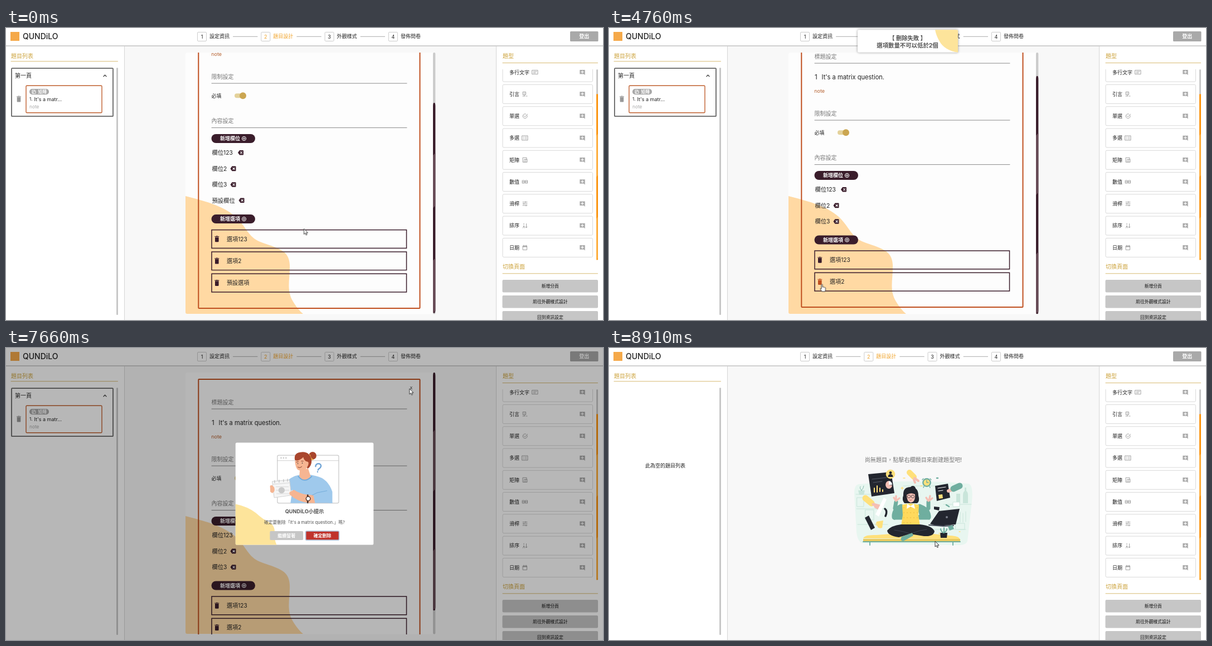
Write an HTML page that moves like this. It is 1071 by 523 pixels and loops after 9.28 s.

```html
<!DOCTYPE html>
<html lang="zh-Hant">
<head>
<meta charset="utf-8">
<title>問卷題目設計</title>
<style>
html, body { margin: 0; width: 100%; height: 100%; overflow: hidden; background: #f8f8f8; }
svg { display: block; width: 1071px; height: 523px; font-family: Inter, "Noto Sans CJK TC", "Noto Sans CJK", sans-serif; }
.mid { text-anchor: middle; }
.b { font-weight: 700; }
.m { font-weight: 500; }
.line { fill: none; stroke-linecap: round; stroke-linejoin: round; }
#scroll, #thumb, #lower, #frame, #field4, #opt3, #hotTag, #hotBin3, #hotBin2, #halo,
#editor, #empty, #toast, #shade, #modal, #cursor, #arrow, #hand {
  animation: 9280ms linear infinite;
}
#scroll { animation-name: scroll; }
#thumb { animation-name: thumb; }
#lower { animation-name: lower; animation-timing-function: step-end; }
#frame { animation-name: frame; animation-timing-function: step-end; }
#field4 { animation-name: field4; animation-timing-function: step-end; }
#opt3 { animation-name: opt3; animation-timing-function: step-end; }
#hotTag { animation-name: hotTag; animation-timing-function: step-end; }
#hotBin3 { animation-name: hotBin3; animation-timing-function: step-end; }
#hotBin2 { animation-name: hotBin2; animation-timing-function: step-end; }
#halo { animation-name: halo; animation-timing-function: step-end; }
#editor { animation-name: editor; animation-timing-function: step-end; }
#empty { animation-name: empty; animation-timing-function: step-end; }
#hand { animation-name: hand; animation-timing-function: step-end; }
#arrow { animation-name: arrow; animation-timing-function: step-end; }
#cursor { animation-name: cursor; animation-timing-function: ease-in-out; }
#shade { animation-name: shade; }
#toast { animation-name: toast; transform-origin: 535.5px 23.5px; filter: drop-shadow(0 0 2px #0006); }
#modal { animation-name: modal; transform-origin: 535.5px 261px; }

@keyframes scroll {
  0% { transform: translateY(-112px); animation-timing-function: step-end; }
  9.7% { transform: translateY(-85.4px); animation-timing-function: step-end; }
  26.72%, 61.31% { transform: translateY(-46px); }
  65.7% { transform: translateY(-17px); }
  67.6%, 100% { transform: none; }
}
@keyframes thumb {
  0% { transform: translate(766px, 134px) scaleY(3.764); animation-timing-function: step-end; }
  9.7% { transform: translate(766px, 116.2px) scaleY(3.957); animation-timing-function: step-end; }
  26.72%, 61.31% { transform: translate(766px, 86px) scaleY(4.26); }
  65.7% { transform: translate(766px, 59.5px) scaleY(4.26); }
  67.6%, 100% { transform: translate(766px, 44px) scaleY(4.26); }
}
@keyframes lower { 0% { transform: translateY(28.6px); } 9.7%, 100% { transform: none; } }
@keyframes frame { 0% { height: 558px; } 9.7% { height: 529.4px; } 26.72%, 100% { height: 490px; } }
@keyframes field4 { 0% { opacity: 1; } 9.7%, 100% { opacity: 0; } }
@keyframes opt3 { 0% { opacity: 1; } 26.72%, 100% { opacity: 0; } }
@keyframes hotTag { 0% { fill: #3a1d2b; } 6.6%, 100% { fill: #bf4f1f; } }
@keyframes hotBin3 { 0% { fill: #3a1d2b; } 24.4%, 100% { fill: #bf4f1f; } }
@keyframes hotBin2 { 0% { fill: #3a1d2b; } 26.72% { fill: #bf4f1f; } 53%, 100% { fill: #3a1d2b; } }
@keyframes halo { 0% { opacity: 0; } 79.6% { opacity: 1; } 81.79%, 100% { opacity: 0; } }
@keyframes editor { 0% { opacity: 1; } 93.9%, 100% { opacity: 0; } }
@keyframes empty { 0% { opacity: 0; } 93.9%, 100% { opacity: 1; } }
@keyframes hand {
  0% { opacity: 0; } 6.6% { opacity: 1; } 10.67% { opacity: 0; } 24.4% { opacity: 1; }
  53% { opacity: 0; } 88.6% { opacity: 1; } 95.6%, 100% { opacity: 0; }
}
@keyframes arrow {
  0% { opacity: 1; } 6.6% { opacity: 0; } 10.67% { opacity: 1; } 24.4% { opacity: 0; }
  53% { opacity: 1; } 88.6% { opacity: 0; } 95.6%, 100% { opacity: 1; }
}
@keyframes cursor {
  0%, .43% { transform: translate(534.5px, 359.5px); }
  6.9%, 10.6% { transform: translate(426px, 309px); }
  10.67%, 15.84% { transform: translate(430px, 311px); }
  23.4% { transform: translate(383px, 464px); }
  25.32%, 51.2% { transform: translate(380px, 460px); }
  51.29%, 51.5% { transform: translate(382.5px, 459.5px); }
  61.1%, 66.3% { transform: translate(617px, 323px); }
  71.23%, 71.44% { transform: translate(680px, 254px); }
  81.25%, 82.4% { transform: translate(724px, 72.5px); }
  89.22%, 100% { transform: translate(585px, 346px); }
}
@keyframes toast {
  0%, 35.44% { opacity: 0; transform: translateY(-5.6px) rotate(2deg); }
  35.45% { opacity: 1; transform: translateY(-5.6px) rotate(2deg); }
  37.23% { transform: rotate(-2deg); }
  39% { transform: translateY(2.8px) rotate(2deg); }
  40.84%, 51.6% { opacity: 1; transform: none; }
  52.7%, 100% { opacity: 0; transform: rotate(1deg); }
}
@keyframes shade { 0%, 81.79% { opacity: 0; } 82.87%, 93.53% { opacity: .4; } 94.9%, 100% { opacity: 0; } }
@keyframes modal {
  0%, 81.78% { opacity: 0; transform: scale(.7); }
  81.79% { opacity: 1; transform: scale(.7); }
  83.24% { transform: scale(1.05); }
  84.37% { transform: scale(.95); }
  85.02%, 93.53% { opacity: 1; transform: none; }
  95.15%, 100% { opacity: 0; transform: scale(.5); }
}
</style>
</head>
<body>
<script>
const DARK = '#3a1d2b', RUST = '#bf4f1f', GOLD = '#cda43f', INK = '#222';
const text = (x, cy, s, size = 9, fill = INK, cls = '') =>
  `<text x="${x}" y="${(cy + size * .37).toFixed(2)}" font-size="${size}" fill="${fill}" class="${cls}">${s}</text>`;
const rect = (x, y, w, h, fill, more = '') => `<rect x="${x}" y="${y}" width="${w}" height="${h}" fill="${fill}" ${more}/>`;
const path = (d, fill, more = '') => `<path d="${d}" fill="${fill}" ${more}/>`;
const line = (d, color, w = 1) => `<path class="line" d="${d}" stroke="${color}" stroke-width="${w}"/>`;
const dot = (x, y, r, fill, more = '') => `<circle cx="${x}" cy="${y}" r="${r}" fill="${fill}" ${more}/>`;
const at = (x, y, body, more = '') => `<g transform="translate(${x} ${y})" ${more}>${body}</g>`;
const group = (id, body) => `<g id="${id}">${body}</g>`;
const each = (list, fn) => list.map(fn).join('');

const bin = (x, y, fill, id = '') => at(x, y, path(
  'M-3.3-3.3h6.6v7.4q0 1.2-1.2 1.2h-4.2q-1.2 0-1.2-1.2zM-4-5h2.3l.7-.7h2l.7.7h2.3v1.1h-8z', fill, id && `id="${id}"`));
const tag = (x, y, id = '') => at(x, y,
  path('M-5 0l3-4.3h6q1 0 1 1v6.6q0 1-1 1h-6z', DARK, id && `id="${id}"`) + line('M-.5-1.6l3.2 3.2m0-3.2l-3.2 3.2', '#fff', 1.1));
const pill = (y, label) => rect(368.5, y - 8, 78.5, 16, DARK, 'rx="8"') + text(384, y, label, 9, '#fff', 'b') +
  dot(427, y, 3.6, 'none', 'stroke="#fff"') + line(`M425 ${y}h4m-2-2v4`, '#fff', .9);
const section = (y, label) => text(368.5, y, label, 10, '#777') + line(`M369 ${y + 12.3}H719`, '#8b8b8b');
const field = (y, label, x, id) => text(369.5, y, label, 10.3) + tag(x, y, id);
const option = (y, label, id) => rect(369, y - 16.4, 349.5, 32.8, 'none', `stroke="${DARK}" stroke-width="1.5"`) +
  bin(378.3, y, DARK, id) + text(396, y, label, 10.1);

function header() {
  const names = ['設定資訊', '題目設計', '外觀樣式', '發佈問卷'];
  return rect(0, 0, 1071, 32, '#fff') + line('M0 32H1071', '#c2c2c2', 1.3) +
    rect(8, 7, 16, 16, '#f5a94a') + text(30, 15, 'QUNDiLO', 14, INK, 'm') +
    each(names, (s, i) => {
      const x = 343 + i * 114.3, on = i === 1 ? '#f0a52e' : INK;
      return rect(x + .5, 7.5, 16, 16, '#fff', 'rx="1.5" stroke="#ccc"') + text(x + 8.5, 15.4, i + 1, 9, on, 'mid') +
        text(x + 22, 15, s, 9, on, 'm') + (i < 3 ? line(`M${x + 64.5} 15.3h43.5`, '#aaa') : '');
    }) + rect(1012, 6, 50.5, 18, '#a9a9a9', 'rx="1.5"') + text(1037.3, 15, '登出', 9, '#fff', 'b mid');
}

const stripes = (x, y, w, h, dark, light) => rect(x, y, w, h, dark, 'rx="1.5"') + each([1, 3], k =>
  path(`M${x} ${y + h * k / 4}l${w} ${-h / 100}v${h / 4}l${-w} ${h / 100}z`, light));

function sidebars() {
  const kinds = ['多行文字', '引言', '單選', '多選', '矩陣', '數值', '滑桿', '排序', '日期'];
  const icons = [
    'M-5-3.5h10v7h-10zM-3-1.2h6M-3 1.2h4', 'M-3.5-4h5v5h-5zM-2-1.5h2M-4 3.5h4M2 3.5h2M-1 1v2',
    'M4-1A4 4 0 1 1 1.5-3.7M-2-.5l2 2 4.5-5', 'M-5-4h10v8h-10zM-3-1.5h1M0-1.5h3M-3 1.5h1M0 1.5h3',
    'M3-1v-3h-7v8h3M-1-1h5v5h-5zM1.5-1v5', 'M-4.5-2.5h3.5v5h-3.5zM1-2.5h3.5v5h-3.5zM-4.5 0h3.5M1 0h3.5',
    'M-4-3h8M-4 0h8M-4 3h8M1-4v2M-2-1v2M2 2v2', 'M-3.5 4l1.5-4 1.5 4M-2-4v2M2.5-3.5v7M.8 2l1.7 1.7L4.2 2',
    'M-3.5-3h7v7h-7zM-3.5-1.5h7M-2-4.5v1.5M2-4.5v1.5M-3.5-2.3h7'];
  const item = (s, i) => {
    const y = 79.2 + i * 39.27;
    return rect(891, y - 17, 161.5, 34, '#fff', 'rx="2" stroke="#d9d9d9"') + text(903, y, s, 9, INK, 'm') +
      at(i ? 931 : 949, y, line(icons[i], '#999', .9)) +
      at(1034, y, path('M-4.7-4.3h9.4v9.4l-2-1.8h-7.4z', '#aaa') + line('M-2.2-.5h4.4M0-2.7v4.4', '#fff', 1.2));
  };
  return rect(0, 32.6, 212, 491, '#fff') + line('M212.5 33V523', '#d5d5d5') +
    text(9, 50, '題目列表', 10, GOLD) + line('M9 59.7H200.5', '#d8bb74') + rect(198, 71, 3, 443, '#c8c8c8', 'rx="1.5"') +
    rect(880, 32.6, 191, 491, '#fff') + line('M879.5 33V523', '#d5d5d5') +
    text(891, 50, '題型', 10, GOLD) + line('M891 62.5H1061.5', '#d8bb74') +
    `<g clip-path="url(#kinds)">${each(kinds, item)}</g>` +
    rect(1059, 74, 3, 341, '#c8c8c8', 'rx="1.5"') + stripes(1059, 118, 3, 297.5, '#fb9410', '#fdac3b') +
    text(891, 427.5, '切換頁面', 10, GOLD) + line('M891 439.8H1061.5', '#d8bb74') +
    each(['新增分頁', '前往外觀樣式設計', '回到資訊設定'], (s, i) =>
      rect(890.5, 451 + i * 28, 171.5, 22.5, '#c6c6c6', 'rx="2"') + text(976.3, 462.5 + i * 28, s, 7.8, '#111', 'mid m'));
}

function pageCard() {
  return rect(10, 72.2, 182, 86, '#fff', 'rx="1" stroke="#666" stroke-width="1.8"') +
    text(16, 85.5, '第一頁', 10) + line('M175 86.8l2.5-2.6 2.5 2.6', INK, 1.2) + bin(23, 127.3, '#999') +
    rect(36, 103.2, 136, 48.5, '#fff', 'rx="1.5" stroke="#c0602f" stroke-width="1.4"') +
    rect(42, 109, 35, 10.3, '#a8a8a8', 'rx="5"') +
    at(50, 114.2, line('M2-1v-2h-5v6h2M-1-1h4v4h-4z', '#fff', .9)) + text(57.5, 114.2, '矩陣', 7.8, '#fff', 'b') +
    text(42, 127.3, '1.', 8) + text(50.5, 127.3, "It's a matr...", 9) + text(42, 140.5, 'note', 8.3, '#aaa');
}

function editor() {
  const body = `<rect id="frame" x="345.3" y="56" width="397.2" height="490" rx="1" fill="none" stroke="${RUST}" stroke-width="2"/>` +
    dot(727, 71, 8.5, '#bdbdbd', 'id="halo"') + text(727, 70.5, 'x', 9, '#444', 'mid') +
    section(96.8, '標題設定') + text(369, 134, '1', 11.5) + text(381.5, 134, "It's a matrix question.", 11.1) +
    text(368.3, 158.3, 'note', 9, '#b5602f') + section(198.8, '限制設定') +
    text(368.5, 233.5, '必填', 9) + rect(410, 229.3, 18, 8, '#e4d29b', 'rx="4"') + dot(425, 233.3, 6, '#cba651') +
    section(278.3, '內容設定') + pill(310, '新增欄位') +
    field(335.3, '欄位123', 421) + field(363.9, '欄位2', 407.5) + field(392.5, '欄位3', 407.5) +
    group('field4', field(420.8, '預設欄位', 422.5, 'hotTag')) +
    group('lower', pill(425.5, '新增選項') + option(461.4, '選項123') + option(500.7, '選項2', 'hotBin2') +
      group('opt3', option(540, '預設選項', 'hotBin3')));
  return pageCard() + rect(322, 44, 448, 468.5, '#fdfdfd', 'rx="4"') +
    path('M322 301C352 309 388 317 412 338 432 357 434 374 456 383 484 394 508 396 509 424 510 450 502 468 515 490 521 500 527 507 533 512H325q-3 0-3-3z', '#ffd9a3') +
    `<g clip-path="url(#panel)">${group('scroll', body)}</g>` +
    rect(766, 44, 4.3, 468.5, '#cbcbcb', 'rx="2"') + group('thumb', stripes(0, 0, 4.3, 100, DARK, '#664a55'));
}

function deskScene() {
  const black = '#23262f', teal = '#6fae9f', mint = '#c9e5da', sun = '#ffe07a', skin = '#f5bfb4';
  return path('M448 244Q545 234 645 243 654 246 651 275L643 346Q640 353 630 353L455 350Q446 347 444 330L440 260Q440 245 448 244z', '#e8f6f0') +
    line('M443 262H500M444 288H500M446 316H500M600 280H650M582 325H640M528 247H600M445 268h12v16h-12zM460 290h15v18h-15zM630 294v18M635 296v16M640 293v18M622 314h16v11h-16z', mint) +
    path('M623 261h7v17h-7zM635 264q0-6 3-8v-6h3v6q3 2 3 8v14h-9zM447 255h12l-2 8h-8z', mint) + line('M453 255q-4-4-2-7M453 255q4-4 4-8', teal, .8) +
    path('M456 341Q458 334 480 335L505 333H582L612 336Q628 337 629 342z', sun) + rect(456, 342, 174, 4, '#e8c95e') +
    line('M456 347H630M468 347v6M617 347v6', teal, 1.8) +
    path('M465 226L506 222 512 260 471 266z', black) + line('M476 258v-7M481 258v-11M486 257v-6M491 257v-3', sun, 2) +
    line('M472 235l26-3M474 241l16-2', '#565b68') + path('M502 238a6 7 0 1 0 6 8l-6-1z', skin) + path('M502 238a6 7 0 0 1 6 7l-6 0z', '#fff') +
    dot(505, 226, 8.3, sun) + dot(505, 223.5, 2.4, black) + path('M500.5 231q0-5 4.5-5t4.5 5z', black) +
    line('M539 223L547 231', sun, 10) + line('M548 233l7 5M547 236l2 5', skin, 4) +
    dot(570, 241, 6.7, sun, `stroke="${teal}" stroke-width="2.4"`) + line('M570 237v4h3M564 234l-2 2M576 234l2 2M565 248l-1 2M575 248l1 2', teal, 1.4) +
    path('M585 247L608 243 612 268 588 274z', black) + line('M590 251l14-2M591 256l8-1', '#fff', 1) + path('M591 263l7-1 1 7-7 1z', sun) +
    line('M609 256L615 254', skin, 6) + line('M618 252L629 247', teal, 11) +
    line('M460 269L471 278', sun, 11) + line('M474 280L485 283M478 284l7 4', skin, 5) + path('M478 298L493 268 498 271 484 302z', '#fff') +
    path('M459 304L466 300 477 322 470 326z', black) + line('M495 288q5 4 1 13', black, 3.5) +
    path('M480 311l12-2-2 13q-5 2-8-1z', sun) + line('M481 312q-4 5 1 6', sun, 1.5) +
    path('M512 286Q507 305 512 308L527 300 531 282zM572 286Q580 300 575 308L557 300 552 282z', teal) +
    line('M524 284Q511 290 512 303L525 303M557 284Q573 290 573 303L558 303', teal, 9) +
    line('M513 287L515 276M573 287L573 276', teal, 7) + line('M515 274l-4-6M515 273l0-8M516 273l5-4M573 274l-4-6M574 273l2-8M575 273l5-4', skin, 3.2) +
    path('M526 281Q540 276 556 281L555 299 558 319H524L527 299z', '#ffd95c') +
    each([...Array(18).keys()], i => dot(529 + i % 5 * 6, 286 + (i / 5 | 0) * 9, .7, '#e2ad35')) +
    path('M528 264Q527 249 541 249 555 249 555 264 558 274 553 278L530 278Q525 272 528 264z', black) + dot(545, 252, 5, black) +
    path('M534 263Q541 258 549 262 550 276 541 277 534 275 534 263z', skin) +
    dot(538, 266, 2.7, 'none', `stroke="${black}" stroke-width=".7"`) + dot(545, 266, 2.7, 'none', `stroke="${black}" stroke-width=".7"`) +
    line('M539 272q2 2 4 0', '#b34d4d', .8) + path('M535 279l6 4 6-4 2 9-8-4-7 4z', '#fff') +
    path('M524 316H558Q579 318 584 328 583 338 565 337L540 333 520 339Q500 336 499 327 506 318 524 316z', black) +
    line('M512 326q16 2 30 7M570 325q-12 1-24 6', '#454a58', .8) + path('M525 338l19-7 2 5-18 10q-7-1-3-8z', teal) +
    path('M576 315L592 292 629 288 622 316 590 319z', black) + dot(606, 303, 2, '#777b87') + line('M574 317L600 319 618 318', '#454a58', 2) +
    path('M594 331h13l-1 9h-11z', black) + line('M600 331q-5-3-5-7M601 331v-9M601 331q5-3 5-7', teal, 2) +
    path('M608 320l8-3 3 7-8 3z', teal) + path('M583 284l10 1-1 6-9-2z', black) + path('M617 276h12v8h-12z', '#fff', `stroke="${mint}"`) +
    line('M524 251h4m-2-2v4M528 233h3M559 247h3M592 332h2M628 329h2', sun, 1.3) + line('M605 281l5 3M588 233h2', teal, 2.5);
}

function helperScene() {
  const skin = '#f6b592', blue = '#9fc9ec', hair = '#a9462d';
  return rect(480.5, 183, 124.5, 97, '#fff', 'rx="3" stroke="#c9c9c9" stroke-width="1.4"') + line('M480 194H605', '#c9c9c9') +
    each([488, 493, 498], x => dot(x, 188.5, 1.5, '#ccc')) +
    path('M524 223Q543 220 559 225 583 230 592 257L592 280H507L511 253 500 263 491 244Q508 225 524 223z', blue) +
    path('M526 212L543 210 548 226Q535 240 525 226z', skin) + line('M523 226q12 15 27 0', '#6fa8d8', 2) +
    dot(552, 184, 7.7, hair) + line('M546 183q1 7 6 9', '#f2bd4b', 2.6) +
    path('M516 193Q513 179 527 177 546 174 550 193 550 206 542 210L533 199z', hair) +
    path('M516 194Q525 195 533 187 535 195 541 196 545 196 543 203L540 209Q533 217 523 213 517 210 516 194z', skin) +
    dot(522, 200, .9, '#333') + dot(531, 199, .9, '#333') + line('M519 197l4-1M529 195l4 0M522 207q4 3 8-1', '#7b3525', 1) +
    line('M558 206q0-5 5-6 6 0 6 5-1 4-5 6l-1 2M562 216.5v.3', '#6fa3d5', 2.6) +
    path('M470 236L505 233 509 264 474 269z', '#f5f5f5', 'stroke="#ccc"') + line('M471 242L506 239M478 247h25M478 254h26M479 261h26', '#d3d3d3') +
    dot(489, 254, 6.4, '#c9c9c9') + line('M475 234v5M484 233v5M493 232v5M501 231v5', '#aaa') +
    path('M466 250Q464 243 470 244L474 248Q477 257 470 260L466 257z', skin) +
    path('M505 258L514 253Q526 261 542 263L585 266Q593 276 584 280H546Q520 277 505 262z', skin) +
    path('M553 262L588 252 592 280H557z', blue) + line('M551 264l10-5 20-4', '#6fa8d8') +
    line('M542 264v15', '#4d3229', 3) + dot(543, 271, 4.3, '#fff', 'stroke="#4d3229" stroke-width="1.6"');
}

const blank = text(101, 211, '此為空的題目列表', 9, INK, 'mid') +
  text(546, 200, '尚無題目，點擊右欄題目來創建題型吧!', 10.1, '#777', 'mid') + deskScene();

const toast = rect(446, 3.3, 180, 40.5, '#fff', 'rx="2.5"') +
  path('M585 3.3Q587 14 593 24 602 40 626 43.8V5.3q0-2-2-2z', '#fde49b') +
  text(535.5, 17.8, '【 刪除失敗 】', 10.3, '#545454', 'b mid') + text(535.5, 30.8, '選項數量不可以低於2個', 10.4, '#545454', 'b mid');

const modal = rect(395.5, 157.5, 280, 207, '#fff', 'rx="3"') +
  path('M395.5 282Q420 287 437 300 450 312 462 318 476 324 475 341 474 354 479 364.5H398.5q-3 0-3-3z', '#fde49b') + helperScene() +
  text(535.5, 297, 'QUNDiLO小提示', 10.4, '#545454', 'b mid') +
  text(535.5, 318.3, "確定要刪除「It's a matrix question.」嗎?", 8.8, '#545454', 'mid') +
  rect(465.3, 336.8, 67.5, 18, '#c6c6c6', 'rx="2"') + text(499, 345.8, '繼續留著', 9, '#fff', 'b mid') +
  rect(538, 336.8, 67.5, 18, '#c0332c', 'rx="2" stroke="#a9bdd6" stroke-width="1.8"') + text(571.8, 345.8, '確定刪除', 9, '#fff', 'b mid');

const cursor = group('arrow', path('M0 0V10l2.3-2.1 1.6 3.5 1.7-.8-1.6-3.3H7z', '#fff', 'stroke="#222" stroke-width=".9"')) +
  group('hand', path('M-1.5.8Q-1.5-.5-.4-.5.7-.5.7.8V4.6Q2 3.7 2.7 4.8 4 4.1 4.6 5.3 6 5 6 6.5V9Q6 10.5 5 12.5H-.5Q-2.2 10-3.6 8-3.6 6.4-1.5 7.6z', '#fff', 'stroke="#222" stroke-width=".9"'));

document.body.innerHTML = `<svg viewBox="0 0 1071 523">
  <clipPath id="panel">${rect(322, 44, 444, 468.5, '#000')}</clipPath>
  <clipPath id="kinds">${rect(885, 74, 172, 341, '#000')}</clipPath>
  ${rect(0, 0, 1071, 523, '#f8f8f8')}${sidebars()}${group('editor', editor())}${group('empty', blank)}${header()}
  ${group('toast', toast)}${rect(0, 0, 1071, 523, '#000', 'id="shade"')}${group('modal', modal)}${group('cursor', cursor)}
</svg>`;
</script>
</body>
</html>
```
